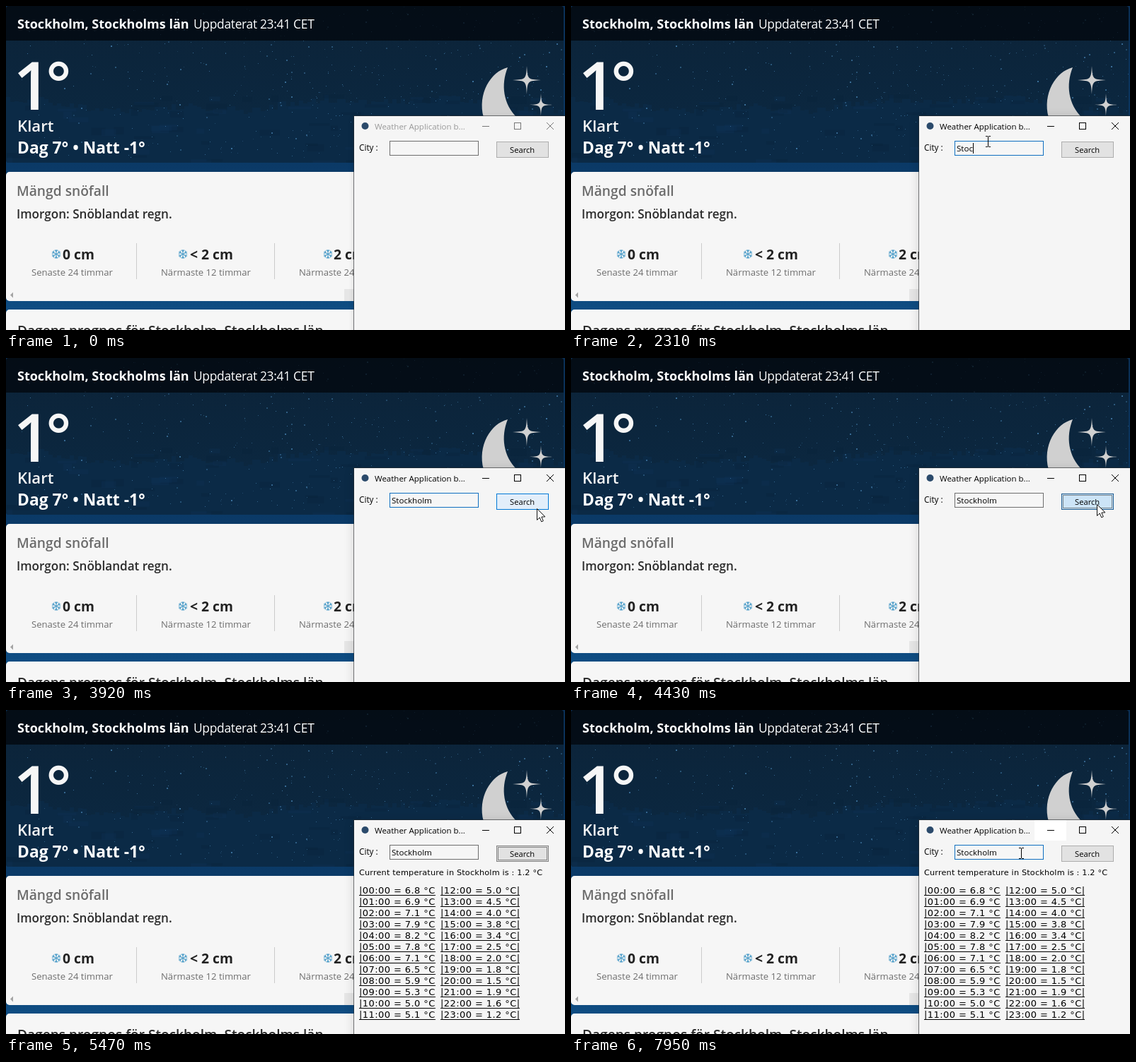
An HTML page with a canvas for the animation above (8000 ms loop, 790 px wide and 459 px high).

```html
<!DOCTYPE html>
<html lang="sv">
<head>
<meta charset="utf-8">
<title>Weather</title>
<style>
  html, body { margin: 0; width: 100%; height: 100%; overflow: hidden; background: #0c4173; }
  canvas { display: block; }
</style>
</head>
<body>
<canvas id="stage" width="790" height="459"></canvas>
<script>
const W = 790, H = 459, LOOP = 8000;
const UI = '"Open Sans", "Noto Sans", sans-serif';
const WIDE = '"DejaVu Sans", sans-serif';
const ctx = document.getElementById('stage').getContext('2d');
const page = document.createElement('canvas');
page.width = W;
page.height = H;

function rect(g, x, y, w, h, fill, line) {
  if (fill) { g.fillStyle = fill; g.fillRect(x, y, w, h); }
  if (line) { g.strokeStyle = line; g.lineWidth = 1; g.strokeRect(x + .5, y + .5, w - 1, h - 1); }
}

function text(g, str, x, y, size, { color = '#000', weight = 400, font = UI, gap = 0 } = {}) {
  g.font = `${weight} ${size}px ${font}`;
  g.letterSpacing = gap + 'px';
  g.fillStyle = color;
  g.fillText(str, x, y);
  return g.measureText(str).width;
}

function poly(g, pts, fill, line) {
  g.beginPath();
  pts.forEach(([x, y]) => g.lineTo(x, y));
  g.closePath();
  if (fill) { g.fillStyle = fill; g.fill(); }
  if (line) { g.strokeStyle = line; g.lineWidth = 1; g.stroke(); }
}

function seeded(seed) {
  return () => (seed = (seed * 16807) % 2147483647) / 2147483647;
}

// ---- static weather page ----

function drawSky(g) {
  const rnd = seeded(4711);
  g.save();
  g.beginPath();
  g.roundRect(0, 0, 788, 222, 4);
  g.clip();
  const sky = g.createLinearGradient(0, 0, 0, 222);
  sky.addColorStop(0, '#0c2338');
  sky.addColorStop(1, '#0b2943');
  rect(g, 0, 0, 788, 222, sky);

  // soft blocky hills
  g.fillStyle = '#0b2a46';
  for (let x = 0; x < 788; x += 6) {
    const top = 134 + 7 * Math.sin(x / 95 - .9) - 4 * Math.sin(x / 31) + rnd() * 12;
    g.fillRect(x, Math.round(top), 6, 222);
  }
  for (let i = 0; i < 70; i++) {
    g.fillStyle = i % 2 ? 'rgba(8,34,56,.3)' : 'rgba(14,52,86,.3)';
    g.fillRect(rnd() * 788, 125 + rnd() * 95, 8 + rnd() * 26, 3 + rnd() * 8);
  }

  for (let i = 0; i < 520; i++) {
    const x = Math.pow(rnd(), .7) * 788, y = rnd() * 215;
    const s = rnd() < .18 ? 2 : 1;
    g.fillStyle = `rgba(80,145,195,${.2 + rnd() * .5})`;
    g.fillRect(Math.round(x), Math.round(y), s, s);
  }
  rect(g, 0, 0, 788, 49, 'rgba(2,6,12,.74)');
  g.restore();
}

function sparkle(g, x, y, r) {
  const c = r * .08;
  g.beginPath();
  g.moveTo(x, y - r);
  for (let i = 1; i <= 4; i++) {
    const a = -Math.PI / 2 + i * Math.PI / 2, m = a - Math.PI / 4;
    const cx = x + Math.cos(m) * c, cy = y + Math.sin(m) * c;
    g.bezierCurveTo(cx, cy, cx, cy, x + Math.cos(a) * r, y + Math.sin(a) * r);
  }
  g.fill();
}

function drawMoon(g) {
  g.fillStyle = '#d0d0d0';
  g.beginPath();
  g.moveTo(709, 87);
  g.bezierCurveTo(685, 93, 666, 124, 675, 158);
  g.lineTo(722, 158);
  g.bezierCurveTo(703, 139, 699, 112, 709, 87);
  g.fill();
  sparkle(g, 736, 105, 20);
  sparkle(g, 756, 140, 16);
}

function snowflake(g, x, y) {
  g.strokeStyle = '#4b9cc8';
  g.lineWidth = 1.1;
  for (let i = 0; i < 6; i++) {
    g.save();
    g.translate(x, y);
    g.rotate(i * Math.PI / 3);
    g.beginPath();
    g.moveTo(0, 0); g.lineTo(0, -6.5);
    g.moveTo(-2.2, -5.8); g.lineTo(0, -3.6); g.lineTo(2.2, -5.8);
    g.stroke();
    g.restore();
  }
}

function drawPage(g) {
  const bg = g.createLinearGradient(0, 0, 0, H);
  bg.addColorStop(0, '#0a2f55');
  bg.addColorStop(.5, '#0b3a67');
  bg.addColorStop(1, '#0f4f86');
  rect(g, 0, 0, W, H, bg);
  drawSky(g);
  drawMoon(g);

  const white = '#fff', bold = { color: '#f6f6f6', weight: 600 };
  text(g, 'Stockholm, Stockholms län', 16, 32, 18, { color: white, weight: 700 });
  text(g, 'Uppdaterat 23:41 CET', 265, 32, 17.4, { color: white, gap: -.3 });
  text(g, '1', 10, 147, 94, bold);
  text(g, '°', 56, 140, 86, bold);
  text(g, 'Klart', 16, 178, 22.2, bold);
  text(g, 'Dag 7° • Natt -1°', 16, 209, 22.8, { color: white, weight: 700 });

  g.fillStyle = '#f6f6f6';
  g.beginPath();
  g.roundRect(0, 235, 788, 183, 5);
  g.roundRect(0, 430, 788, 60, 5);
  g.fill();

  text(g, 'Mängd snöfall', 15, 269, 19.2, { color: '#6c6c6c', weight: 600 });
  text(g, 'Imorgon: Snöblandat regn.', 15, 301, 17.1, { color: '#2b2b2b', weight: 600 });
  const cells = [
    [71, 80, '0 cm', 36, 'Senaste 24 timmar'],
    [250, 260, '< 2 cm', 219, 'Närmaste 12 timmar'],
    [455, 463, '2 cm', 414, 'Närmaste 24 timmar']
  ];
  for (const [fx, ax, amount, lx, label] of cells) {
    snowflake(g, fx, 351.5);
    text(g, amount, ax, 359, 19.3, { color: '#222', weight: 700 });
    text(g, label, lx, 382, 13.1, { color: '#6e6e6e' });
  }
  rect(g, 184, 336, 1, 51, '#cbcbcb');
  rect(g, 379, 336, 1, 51, '#cbcbcb');
  poly(g, [[6, 409.5], [10, 405.5], [10, 413.5]], '#a3a3a3');
  rect(g, 478, 401, 20, 17, '#e6e6e6');
  text(g, 'Dagens prognos för Stockholm, Stockholms län', 16, 467, 19.1, { color: '#2b2b2b', weight: 600 });
}

// ---- application window ----

const typed = [
  [1080, 'S'], [1420, 'St'], [1480, 'Sto'], [1720, 'Stok'], [1810, 'Stokc'],
  [2130, 'Stok'], [2190, 'Sto'], [2310, 'Stoc'], [2450, 'Stock'], [2540, 'Stockh'],
  [2680, 'Stockho'], [2860, 'Stockhol'], [2950, 'Stockholm']
];

const morning = '6.8 6.9 7.1 7.9 8.2 7.8 7.1 6.5 5.9 5.3 5.0 5.1'.split(' ');
const evening = '5.0 4.5 4.0 3.8 3.4 2.5 2.0 1.8 1.5 1.9 1.6 1.2'.split(' ');

const within = (t, a, b) => t >= a && t < b;

function drawTitle(g, t) {
  const ink = t >= 480 ? '#000' : '#999';
  if (t >= 6310) rect(g, 655, 156, 45, 29, '#fff');
  g.fillStyle = '#2b4a6b';
  g.beginPath();
  g.arc(507.5, 170, 5, 0, 7);
  g.fill();
  text(g, 'Weather Application b...', 521, 175, 11.5, { color: ink });
  const line = t >= 480 ? '#000' : '#777';
  rect(g, 673, 170, 10, 1, line);
  rect(g, 718, 165, 10, 10, null, line);
  g.strokeStyle = line;
  g.lineWidth = 1;
  g.beginPath();
  g.moveTo(764, 165); g.lineTo(774, 175);
  g.moveTo(774, 165); g.lineTo(764, 175);
  g.stroke();
}

function drawEntry(g, t) {
  const start = within(t, 480, 4110) ? 480 : t >= 7350 ? 7350 : -1;
  rect(g, 542, 191, 126, 21, '#f6f6f6', start < 0 ? '#6e6e6e' : '#0f6fc0');
  let value = '';
  for (const [at, str] of typed) if (t >= at) value = str;
  const w = text(g, value, 545, 206, 11.6);
  if (start >= 0 && (t - start) % 885 < 600) {
    rect(g, Math.round(545 + w), 194, 1, 15, '#000');
  }
}

function drawButton(g, t) {
  const pressed = within(t, 4110, 4530);
  const hover = within(t, 3840, 4110) || within(t, 5160, 5290);
  const focus = within(t, 4110, 7350);
  const fill = pressed ? '#cce4f7' : hover ? '#e2eefa' : '#e2e2e2';
  const line = pressed ? '#1c5a8f' : hover ? '#0078d7' : focus ? '#808080' : '#adadad';
  rect(g, 693, 192, 74, 23, fill, line);
  if (focus) {
    g.setLineDash([1, 1]);
    rect(g, 695, 194, 70, 19, null, '#222');
    g.setLineDash([]);
  }
  text(g, 'Search', 712, 208, 11.2);
}

function drawForecast(g) {
  text(g, 'Current temperature in Stockholm is : 1.2 °C', 499, 234, 11.3, { font: WIDE, gap: .15 });
  const row = (str, x, y) => {
    const w = text(g, str, x, y, 13, { font: WIDE, gap: .42 });
    rect(g, x, y + 2, Math.round(w), 1, '#000');
  };
  for (let i = 0; i < 12; i++) {
    const y = 260 + i * 16;
    row(`|${String(i).padStart(2, '0')}:00 = ${morning[i]} °C`, 499, y);
    row(`|${i + 12}:00 = ${evening[i]} °C|`, 614, y);
  }
}

function drawWindow(g, t) {
  rect(g, 491, 155, 320, 330, null, 'rgba(40,44,48,.6)');
  g.save();
  g.shadowColor = 'rgba(0,0,0,.16)';
  g.shadowBlur = t >= 480 ? 14 : 8;
  g.shadowOffsetY = 2;
  rect(g, 492, 156, 320, 330, '#f5f5f5');
  g.restore();
  drawTitle(g, t);
  text(g, 'City :', 499, 205, 11.8);
  drawEntry(g, t);
  drawButton(g, t);
  if (t >= 4670) drawForecast(g);
}

// ---- pointer ----

// each move: first and last change, shape, stops spread evenly between
const moves = [
  [60, 340, 'arrow', [[688, 428], [653, 362], [627, 306], [614, 269], [604, 242], [598, 232], [592, 220]]],
  [387, 480, 'beam', [[590, 206], [589, 196], [589, 192]]],
  [3590, 3630, 'beam', [[590, 190], [600, 197]]],
  [3670, 3970, 'arrow', [[643, 212], [679, 229], [712, 234], [745, 232], [756, 221], [750, 213], [746, 209], [743, 207]]],
  [4480, 4820, 'arrow', [[742, 209], [741, 213], [739, 218], [737, 224], [735, 230], [734, 236], [733, 241], [733, 244]]],
  [5070, 5120, 'arrow', [[733, 242], [733, 240]]],
  [5160, 5420, 'arrow', [[729, 222], [718, 196], [704, 160], [683, 118], [660, 70]]],
  [5470, 5471, 'none', [[0, 0]]],
  [6310, 6360, 'arrow', [[674, 446], [670, 429]]],
  [6720, 7040, 'arrow', [[657, 428], [650, 392], [645, 350], [641, 310], [639, 275], [638, 248], [637, 227], [637, 213]]],
  [7180, 7300, 'beam', [[637, 209], [636, 206], [636, 203]]]
];

const arrow = [[0, 0], [0, 16], [3.7, 12.5], [6.2, 18.4], [8.8, 17.3], [6.3, 11.6], [11.4, 11.4]];

function drawPointer(g, t) {
  const move = moves.filter(m => t >= m[0]).pop();
  if (!move) return;
  const [from, to, shape, stops] = move;
  const last = stops.length - 1;
  const i = Math.min(last, Math.floor((t - from) / (to - from) * last + .001));
  const [x, y] = stops[i];
  if (shape === 'arrow') {
    poly(g, arrow.map(([dx, dy]) => [x + .5 + dx, y + .5 + dy]), '#fff', '#111');
  } else if (shape === 'beam') {
    rect(g, x, y - 7, 1, 14, '#000');
    for (const dy of [-8, 7]) {
      rect(g, x - 3, y + dy, 3, 1, '#000');
      rect(g, x + 1, y + dy, 3, 1, '#000');
    }
  }
}

drawPage(page.getContext('2d'));
const begin = performance.now();

function frame() {
  const t = (performance.now() - begin) % LOOP;
  ctx.drawImage(page, 0, 0);
  drawWindow(ctx, t);
  drawPointer(ctx, t);
  requestAnimationFrame(frame);
}
frame();
</script>
</body>
</html>
```
